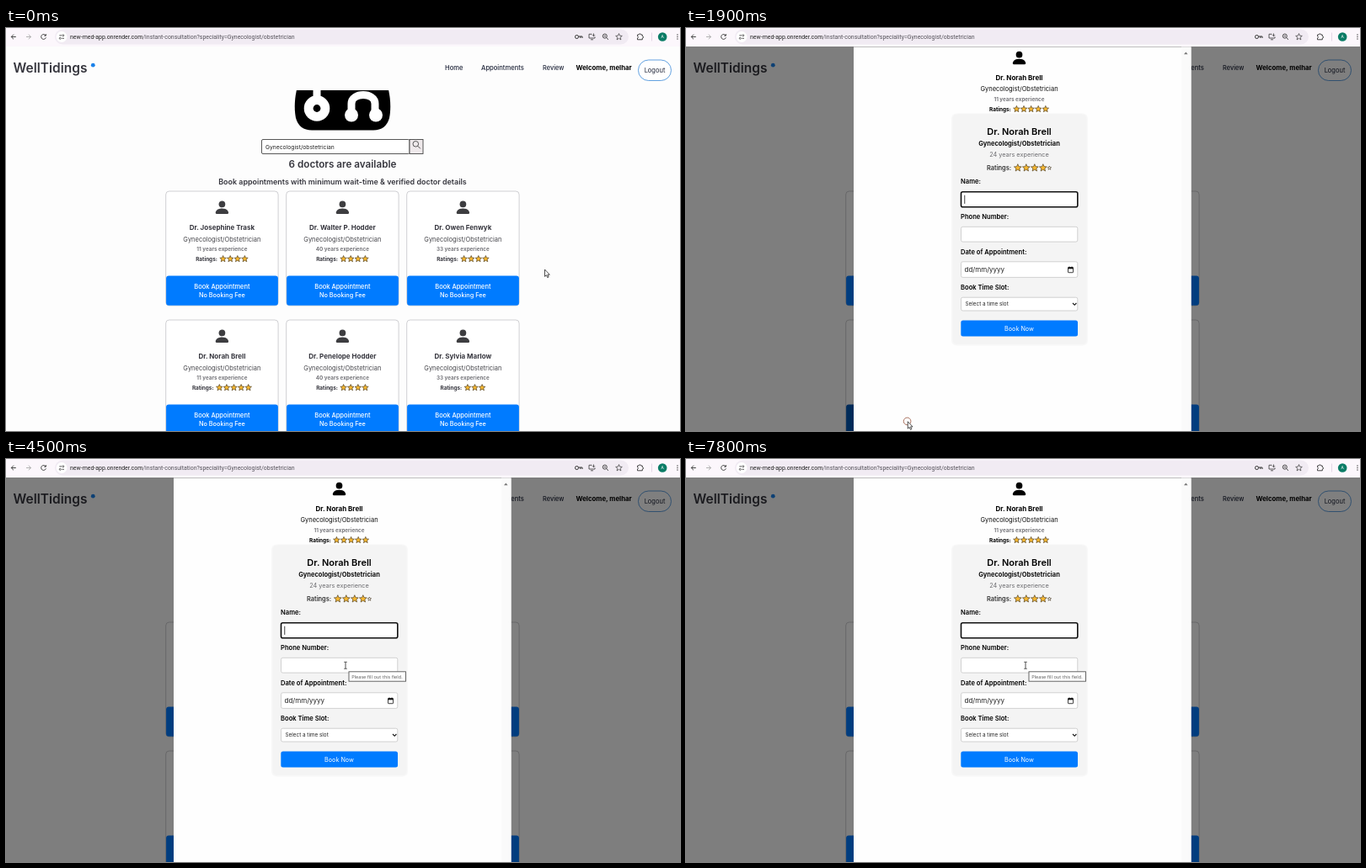
Animation, 800 px wide and 479 px high, one loop 8 s. Source, as an HTML page:

```html
<!DOCTYPE html>
<html lang="en">
<head>
<meta charset="utf-8">
<title>Doctor booking</title>
<style>
html, body { margin: 0; width: 100%; height: 100%; overflow: hidden; background: #fdfdfd; }
svg { display: block; width: 100vw; height: 100vh; }
text { font-family: Inter, sans-serif; white-space: pre; }
.ui { font-family: Roboto, sans-serif; }
.tip { font-family: "Open Sans", sans-serif; }
</style>
</head>
<body>
<svg id="stage" viewBox="0 0 800 479">
  <defs>
    <clipPath id="below"><rect y="74" width="800" height="405"/></clipPath>
  </defs>
  <g id="page"></g>
  <g id="bar"></g>
  <g id="modal"></g>
  <g id="pointer"></g>
</svg>
<script>
const NS = 'http://www.w3.org/2000/svg';
const LOOP = 8000, OPEN = 1900, TIP = 4100;
const BLUE = '#007bff', DARK = '#0056b3', INK = '#36363e';
const $ = id => document.getElementById(id);

function add(parent, tag, attrs, content) {
  const el = document.createElementNS(NS, tag);
  for (const k in attrs) el.setAttribute(k, attrs[k]);
  if (content) el.textContent = content;
  parent.appendChild(el);
  return el;
}
const rect = (g, x, y, width, height, fill, more) =>
  add(g, 'rect', { x, y, width, height, fill, ...more });
const dot = (g, cx, cy, r, fill, more) => add(g, 'circle', { cx, cy, r, fill, ...more });
const line = (g, d, stroke, w = 1, more) =>
  add(g, 'path', { d, stroke, 'stroke-width': w, fill: 'none', ...more });
const text = (g, x, y, str, size, weight = 400, fill = INK, more) =>
  add(g, 'text', { x, y, 'font-size': size, 'font-weight': weight, fill, ...more }, str);
const mid = (g, x, y, str, size, weight, fill) =>
  text(g, x, y, str, size, weight, fill, { 'text-anchor': 'middle' });

function star(g, x, y, r, fill = '#f5b731') {
  const pts = [];
  for (let i = 0; i < 10; i++) {
    const a = (i / 5 - 0.5) * Math.PI, q = i % 2 ? r * 0.45 : r;
    pts.push((x + q * Math.cos(a)).toFixed(2) + ',' + (y + q * Math.sin(a)).toFixed(2));
  }
  add(g, 'polygon', { points: pts.join(' '), fill, stroke: '#3a2a10', 'stroke-width': 0.6 });
}

function person(g, x, y, fill) {
  const p = add(g, 'g', { transform: `translate(${x} ${y}) scale(1.28)` });
  dot(p, 0, -3, 3, fill);
  add(p, 'path', { d: 'M-5 6s-1 0-1-1 1-4 6-4 6 3 6 4-1 1-1 1z', fill });
}

function ratings(g, cx, y, n, fill) {
  const x = cx - (28 + 8.6 * n) / 2;
  text(g, x, y, 'Ratings:', 6.4, 700, fill);
  for (let i = 0; i < n; i++) star(g, x + 32.4 + 8.6 * i, y - 2.3, 4);
}

// Page
const page = $('page');
rect(page, 0, 22, 800, 457, '#fdfdfd');

function hero(g) {
  const h = add(g, 'g', { 'clip-path': 'url(#below)' });
  add(h, 'path', { d: 'M347 66C342 82 342 97 344 107Q348 121.5 363 121.5H436Q451 121.5 455 107C457 97 457 82 452 66Z', fill: '#000' });
  line(h, 'M369 66V84', '#fff', 9);
  dot(h, 369, 95.5, 15.3, '#fff');
  dot(h, 369, 95.5, 4.4, '#000');
  line(h, 'M410 104V90C410 76 438 76 438 90V104', '#fff', 9);
  dot(h, 410, 103.5, 8, '#fff');
  dot(h, 439, 103.5, 8, '#fff');
}
hero(page);

text(page, 8.5, 53.3, 'WellTidings', 15.5, 600);
dot(page, 103.3, 44.2, 2.4, '#1b82ea');
text(page, 521, 50.4, 'Home', 7.6, 500, '#20263a');
text(page, 564, 50.4, 'Appointments', 7.6, 500, '#20263a');
text(page, 637, 50.4, 'Review', 7.4, 500, '#20263a');
text(page, 676.5, 50.4, 'Welcome, melhar', 7.8, 700, '#000');
rect(page, 750.5, 38, 39, 24.5, '#fff', { rx: 12.2, stroke: '#3a8ad8', 'stroke-width': 0.8 });
mid(page, 770, 52.8, 'Logout', 7.5, 400, '#20263a');

rect(page, 303.5, 132.5, 175.5, 17, '#fff', { rx: 1.5, stroke: '#444', 'stroke-width': 0.9 });
text(page, 308, 143.7, 'Gynecologist/obstetrician', 6.75, 400, '#222');
rect(page, 479, 132.5, 16, 17, '#efe9eb', { stroke: '#444', 'stroke-width': 0.9 });
dot(page, 486.3, 137.8, 3.3, 'none', { stroke: '#333', 'stroke-width': 0.8 });
line(page, 'M488.8 140.3L491.8 143.3', '#333', 0.9);
mid(page, 399.5, 166.2, '6 doctors are available', 11.7, 600);
mid(page, 399.5, 186.1, 'Book appointments with minimum wait-time & verified doctor details', 8.95, 600);

const doctors = [
  ['Josephine Trask', 11, 4], ['Walter P. Hodder', 40, 4], ['Owen Fenwyk', 33, 4],
  ['Norah Brell', 11, 5], ['Penelope Hodder', 40, 4], ['Sylvia Marlow', 33, 3]
];
const buttons = doctors.map(([name, years, stars], i) => {
  const x = 189.7 + 143 * (i % 3), y = 194 + 153 * Math.floor(i / 3), c = x + 66.7;
  rect(page, x, y, 133.4, 136, '#fff', { rx: 4, stroke: '#c4c4c8', 'stroke-width': 0.8 });
  person(page, c, y + 19.3, '#3d3d40');
  mid(page, c, y + 46, 'Dr. ' + name, 8, 700);
  mid(page, c, y + 59.6, 'Gynecologist/Obstetrician', 7.5, 400, '#47474c');
  mid(page, c, y + 71, years + ' years experience', 6.3, 700, '#77777c');
  ratings(page, c, y + 82.8, stars, INK);
  const el = rect(page, x + 0.4, y + 100.6, 132.8, 35.2, BLUE, { rx: 3 });
  mid(page, c, y + 115.6, 'Book Appointment', 7.5, 500, '#fff');
  mid(page, c, y + 126, 'No Booking Fee', 7.3, 500, '#fff');
  return { el, x, y: y + 101 };
});

// Browser toolbar
const bar = $('bar');
rect(bar, 0, 0, 800, 22, '#fcf7fc');
rect(bar, 58, 1.5, 681, 18, '#f1ebf3', { rx: 9 });
line(bar, 'M11.8 10.5H6.4M9 7.7L6.2 10.5L9 13.3', '#333', 0.9);
line(bar, 'M24 10.5H29.4M26.8 7.7L29.6 10.5L26.8 13.3', '#aaa', 0.9);
line(bar, 'M47 8.8A2.9 2.9 0 1 0 47.4 11.3M47.4 7.2V9.2H45.4', '#333', 0.9);
dot(bar, 66, 10.5, 6.4, '#fff');
line(bar, 'M63.3 8.8H66M66.3 12.3H69', '#333', 0.8);
dot(bar, 67.8, 8.8, 1, 'none', { stroke: '#333', 'stroke-width': 0.7 });
dot(bar, 64.3, 12.3, 1, 'none', { stroke: '#333', 'stroke-width': 0.7 });
const url = text(bar, 76, 13, '', 6.94, 400, '#222', { class: 'ui' });
add(url, 'tspan', {}, 'new-med-app.onrender.com');
add(url, 'tspan', { fill: '#55525a' }, '/instant-consultation?speciality=Gynecologist/obstetrician');
dot(bar, 677.5, 10.5, 2, 'none', { stroke: '#333', 'stroke-width': 1 });
line(bar, 'M679.5 10H684V12M681.8 10V12', '#333', 1);
line(bar, 'M695.5 7.3H692V12H699V10.5M694 13.8H697M697.5 6.5V9.5M696 8.3L697.5 9.8L699 8.3', '#333', 0.8);
dot(bar, 710.8, 9.6, 2.5, 'none', { stroke: '#333', 'stroke-width': 0.9 });
line(bar, 'M712.7 11.5L715 13.8M709.7 9.6H711.9', '#333', 0.9);
line(bar, 'M727.5 6.6L728.6 9.2L731.3 9.4L729.2 11.2L729.9 13.9L727.5 12.4L725.1 13.9L725.8 11.2L723.7 9.4L726.4 9.2Z', '#333', 0.7);
line(bar, 'M749.5 8H751.2A1.2 1.2 0 0 1 753.6 8H755.3V9.7A1.2 1.2 0 0 1 755.3 12.1V13.8H749.5V12A1.2 1.2 0 0 0 749.5 9.7Z', '#333', 0.9);
line(bar, 'M766.5 5.5V15.5', '#ddd0e0', 0.8);
dot(bar, 779.2, 10.5, 5.3, '#0a7c66');
mid(bar, 779.2, 12.3, 'A', 4.8, 400, '#fff');
for (const y of [8, 10.5, 13]) dot(bar, 797, y, 0.7, '#333');

// Booking dialog
const modal = $('modal');
rect(modal, 0, 22, 800, 457, '#000', { opacity: 0.5 });
rect(modal, 199, 22.5, 400.5, 457, '#fefefe');
rect(modal, 588, 22.5, 11.5, 457, '#fafafa');
add(modal, 'path', { d: 'M591 31.2L593.3 28.4L595.6 31.2Z', fill: '#777' });
person(modal, 395.5, 35.5, '#000');
mid(modal, 395.5, 62, 'Dr. Norah Brell', 8, 700, '#000');
mid(modal, 395.5, 75.2, 'Gynecologist/Obstetrician', 7.5, 400, '#111');
mid(modal, 395.5, 87, '11 years experience', 6.3, 700, '#77777c');
ratings(modal, 395.5, 98.7, 5, '#000');

rect(modal, 315, 101.5, 162, 276, '#f8f8f8', { rx: 6 });
rect(modal, 316.5, 102.5, 159, 273.5, '#f4f4f4', { rx: 5 });
mid(modal, 395.5, 127.3, 'Dr. Norah Brell', 11, 600, '#000');
mid(modal, 395.5, 140, 'Gynecologist/Obstetrician', 7.5, 700, '#111');
mid(modal, 395.5, 153.2, '24 years experience', 7.3, 400, '#6c6c70');
text(modal, 357, 168.6, 'Ratings:', 7.4, 600, '#333');
for (let i = 0; i < 4; i++) star(modal, 393.8 + 10 * i, 166.3, 4.6);
star(modal, 431.4, 166.4, 2.3, '#fff');

const label = (y, str) => text(modal, 326, y, str, 7.6, 600, '#000');
const field = (y, h, more) =>
  rect(modal, 326.5, y, 138.3, h, '#fff', { rx: 2, stroke: '#ccc', 'stroke-width': 0.9, ...more });
label(185.4, 'Name:');
field(194.8, 17.9, { stroke: '#101010', 'stroke-width': 1.6 });
const caret = rect(modal, 330.4, 198.7, 0.8, 10.2, '#111');
label(227.2, 'Phone Number:');
field(236.3, 17.8);
label(269, 'Date of Appointment:');
field(277.8, 18.6);
text(modal, 330.5, 289.8, 'dd/mm/yyyy', 8, 400, '#222');
rect(modal, 453.5, 284.7, 6, 6, 'none', { rx: 0.6, stroke: '#111', 'stroke-width': 0.8 });
rect(modal, 453.3, 284.3, 6.4, 2, '#111');
line(modal, 'M455 283.4V285M458 283.4V285', '#111', 0.8);
label(311, 'Book Time Slot:');
field(320.2, 15.8);
text(modal, 331.5, 330.4, 'Select a time slot', 6.35, 400, '#222');
line(modal, 'M459 327L461.2 329.3L463.4 327', '#111', 1.1);
rect(modal, 326.3, 347.5, 138.7, 19, BLUE, { rx: 2.5 });
mid(modal, 395.5, 359.6, 'Book Now', 7.2, 400, '#fff');

const tip = add(modal, 'g', {});
rect(tip, 407, 252.8, 67.5, 11.4, '#fff', { stroke: '#555', 'stroke-width': 0.9 });
text(tip, 410.3, 260.8, 'Please fill out this field.', 5.65, 400, '#555', { class: 'tip' });

// Pointer shapes, each with its hot spot at 0,0
const pointer = $('pointer');
const ring = dot(pointer, 262.6, 467.4, 4.3, 'none', { stroke: '#a0634f', 'stroke-width': 0.9 });
const shapes = {
  arrow: 'M0 0V8.4L1.9 6.7L3.2 9.6L4.6 9L3.3 6.2H5.8Z',
  hand: 'M-1 1.2Q-1 0 0 0T1 1.2V4L3.6 4.6Q4.6 4.9 4.5 6L4 8.4L3.4 10.6H-1L-3.2 7.2Q-3.6 6 -2.4 6L-1 7Z',
  beam: 'M-1.7-4H-.4Q0-4 0-3.4V3.4Q0 4 .4 4H1.7M1.7-4H.4Q0-4 0-3.4M0 3.4Q0 4-.4 4H-1.7'
};
for (const k in shapes) {
  shapes[k] = add(pointer, 'path', {
    d: shapes[k], fill: k === 'beam' ? 'none' : '#fff', stroke: '#222',
    'stroke-width': 0.8, 'stroke-linejoin': 'round'
  });
}

// Stops: time, x, y
const path = [
  [300, 639.5, 287], [950, 430, 392], [1050, 430, 392], [1750, 263.5, 468],
  [2050, 263, 467.5], [3300, 387, 271], [3650, 403, 245.3]
];
const ease = p => p * p * (3 - 2 * p);

function locate(t) {
  let a = path[0];
  for (const b of path) {
    if (t < b[0]) {
      if (a === b) break;
      const p = ease((t - a[0]) / (b[0] - a[0]));
      return [a[1] + (b[1] - a[1]) * p, a[2] + (b[2] - a[2]) * p];
    }
    a = b;
  }
  return [a[1], a[2]];
}
const show = (el, on) => el.setAttribute('visibility', on ? 'inherit' : 'hidden');

function draw(t) {
  const [x, y] = locate(t), open = t >= OPEN;
  let kind = 'arrow';
  for (const b of buttons) {
    const over = t < OPEN + 100 && x > b.x && x < b.x + 133.4 && y > b.y && y < b.y + 35;
    b.el.setAttribute('fill', over ? DARK : BLUE);
    if (over && !open) kind = 'hand';
  }
  if (open && y > 236 && y < 254) kind = 'beam';
  for (const k in shapes) {
    show(shapes[k], k === kind);
    shapes[k].setAttribute('transform', `translate(${x.toFixed(2)} ${y.toFixed(2)})`);
  }
  show(modal, open);
  show(tip, open && t >= TIP);
  show(caret, open && (t + 200) % 800 >= 300);
  show(ring, open && t < 2150);
  ring.setAttribute('opacity', Math.max(0, 1 - Math.max(0, t - 1950) / 200));
}

const start = performance.now();
function tick() {
  draw((performance.now() - start) % LOOP);
  requestAnimationFrame(tick);
}
draw(0);
requestAnimationFrame(tick);
</script>
</body>
</html>
```
